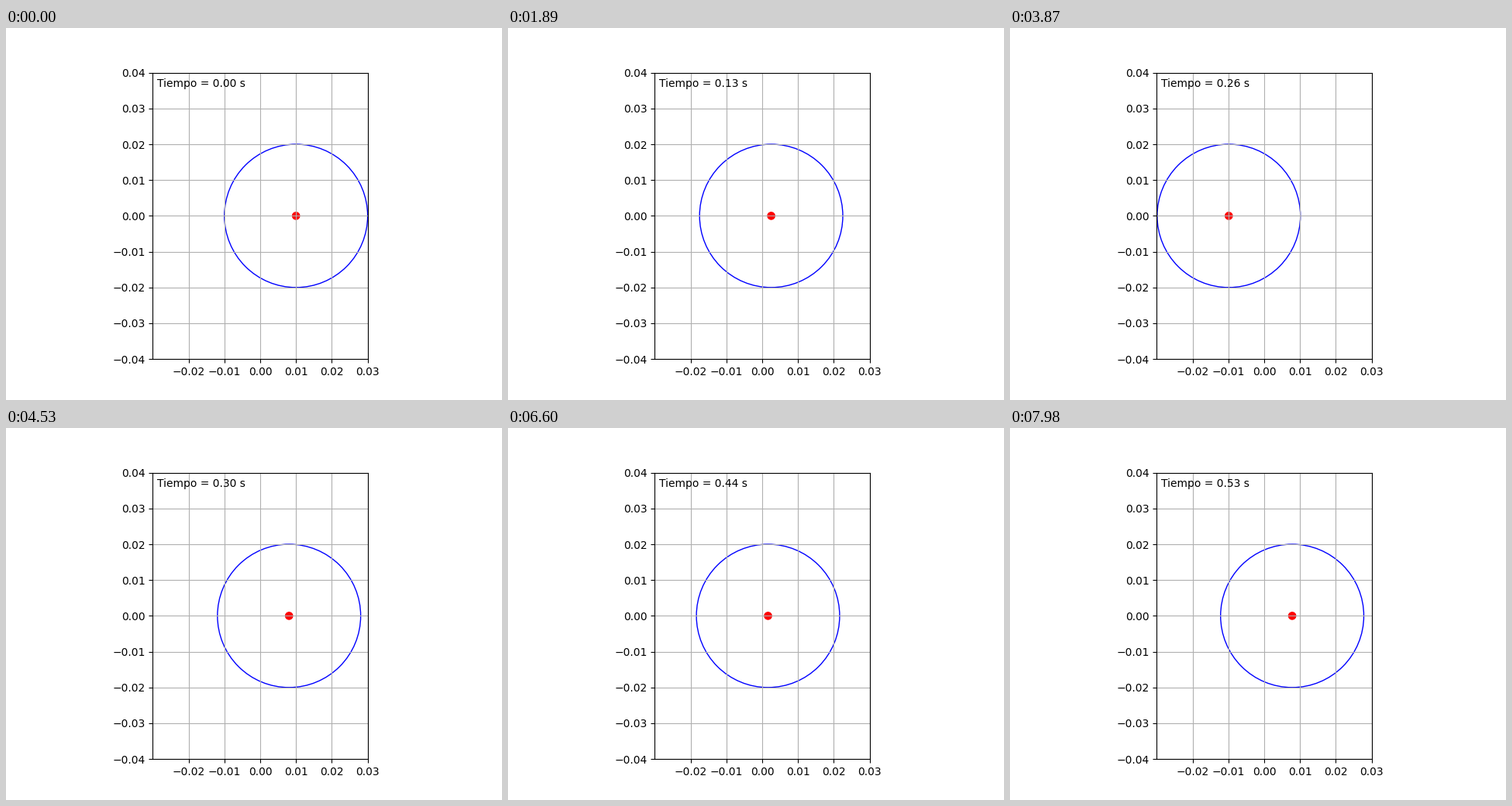
Animation, 640 px wide and 480 px high, one loop 8000 ms. Source, as a matplotlib script:

```python
import numpy as np
import matplotlib.pyplot as plt
from matplotlib.animation import FuncAnimation
from matplotlib.patches import Circle

LOOP_MS = 8000
FRAMES = 267
DT = 0.002            # simulated seconds per frame
AMPLITUDE = 0.01
OMEGA = 2 * np.pi * 9.6

fig, ax = plt.subplots(figsize=(6.4, 4.8), dpi=100)
ax.set_aspect("equal")
ax.set_xlim(-0.03, 0.03)
ax.set_ylim(-0.04, 0.04)
ax.set_xticks(np.arange(-2, 4) / 100)
ax.set_yticks(np.arange(-4, 5) / 100)
ax.grid(True)

ring = ax.add_patch(Circle((AMPLITUDE, 0), 0.02, color="b", fill=False))
dot = ax.add_patch(Circle((AMPLITUDE, 0), 0.001, color="r"))
label = ax.text(0.02, 0.95, "", transform=ax.transAxes)


def update(i):
    t = i * DT
    x = AMPLITUDE * np.cos(OMEGA * t)
    ring.center = dot.center = (x, 0)
    label.set_text(f"Tiempo = {t:.2f} s")
    return ring, dot, label


anim = FuncAnimation(fig, update, frames=FRAMES, interval=LOOP_MS / FRAMES,
                     repeat=True, repeat_delay=0)
plt.show()
```
